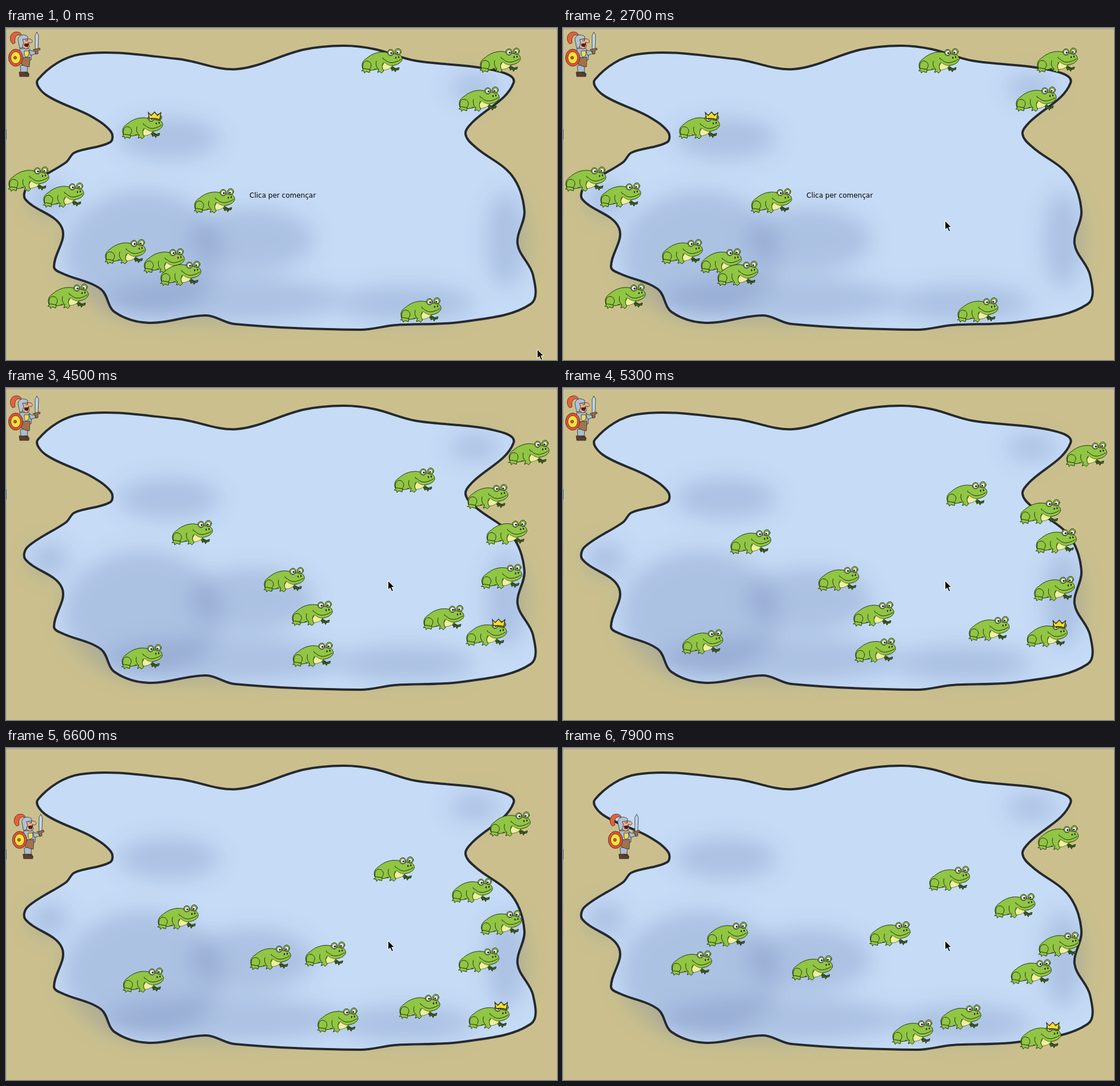
An HTML page for the animation above (8 s loop, 964 px wide and 581 px high).

```html
<!DOCTYPE html>
<html lang="ca">
<head>
<meta charset="utf-8">
<title>Granotes</title>
<style>
  html, body { margin: 0; width: 100%; height: 100%; overflow: hidden; background: #cbc08d; }
  svg { display: block; }
  text { font: 12px "DejaVu Sans", sans-serif; }
</style>
</head>
<body>
<svg width="964" height="581" viewBox="0 0 964 581">
  <defs>
    <filter id="soft" x="-60%" y="-60%" width="220%" height="220%"><feGaussianBlur stdDeviation="18"/></filter>

    <g id="frog" stroke="#22330f" stroke-linejoin="round" stroke-linecap="round" fill="#91c544">
      <path fill="#44682a" d="M53 31L61 36 67 34 66 38 60 39 53 37Z"/>
      <path d="M3 36C0 29 3 22 10 18C20 9 34 5 46 8L68 12C73 16 73 21 70 24C66 29 59 30 54 31C48 37 40 38 28 37C18 40 8 40 3 36Z"/>
      <path fill="#eff09c" stroke-width=".6" d="M24 37C33 36 39 31 41 25C45 29 50 31 55 31C52 36 44 40 36 38Z"/>
      <path d="M4 37C1 28 6 21 12 23C19 25 20 33 14 38Z"/>
      <path d="M5 36L1 40 5 40 6 44 9 41 15 43 16 38Z"/>
      <path d="M27 23C25 30 28 35 31 37L29 43 33 41 36 44 40 40C36 35 37 30 39 26"/>
      <path fill="#44682a" d="M55 35L54 40 58 38 60 42 62 38Z"/>
      <circle cx="52" cy="8" r="5.5"/><circle cx="65" cy="6.500" r="5.5"/>
      <g fill="#fff" stroke-width=".7"><circle cx="52" cy="8.500" r="3.9"/><circle cx="65" cy="7" r="3.5"/></g>
      <g fill="#22101c" stroke="none">
        <circle cx="53" cy="9" r="1.700"/><circle cx="64" cy="8" r="1.500"/>
        <ellipse cx="61" cy="17" rx="1.1" ry="1.8"/><ellipse cx="66" cy="16" rx="1.1" ry="1.8"/>
      </g>
      <path fill="none" d="M38 17q0 3 3 3q8 8 18 5q7-2 11-5"/>
    </g>
    <path id="crown" fill="#f3dc2c" stroke="#2b2b10" stroke-width="1.3" d="M49 9L47-2 52 3 58-3 63 3 69-2 67 10Q58 7 49 9Z"/>
  </defs>

  <rect width="964" height="581" fill="#cbc08d"/>
  <path class="pond" fill="#c6dbf6"/>
  <g id="shade" filter="url(#soft)" fill="#6078ab"></g>
  <path class="pond" fill="none" stroke="#25292f" stroke-width="4"/>
  <path d="M0 .5H964" stroke="#c9c9c6"/><path d="M0 1.500H964" stroke="#96917c"/>
  <path d="M.5 0V581" stroke="#a6a6a6"/><path d="M.5 177V195" stroke="#2d68b0"/>

  <text id="prompt" x="426" y="297">Clica per començar</text>
  <g id="frogs"></g>

  <g id="knight" stroke="#2e2a2c" stroke-width=".8" stroke-linejoin="round">
    <path fill="#e8603c" d="M20 24C20 15 24 9 20 6C14 5 10 11 12 20L8 22C1 17 2 2 13 1C22 0 24 6 23 10L22 24Z"/>
    <path fill="#a9bdd0" d="M21 60L22 72 33 73 34 58Z"/>
    <path fill="#5d3d2b" d="M19 71L28 71 36 76V79H20ZM28 71H34L37 76Z"/>
    <path fill="#a9bdd0" d="M20 30L36 30 41 36 40 50 21 50Z"/>
    <path fill="#a2724d" d="M24 46L38 45 37 62 30 61 22 57Z"/>
    <path fill="#efdc58" d="M28 34H36V42L31 45 28 42Z"/>
    <path fill="#efb08a" d="M24 13H34C42 12 44 18 40 20L35 19 37 27 31 31 24 27Z"/>
    <path fill="#adc3d8" d="M17 15C17 7 26 3 34 9L34 13 25 14 27 20 24 29 20 29Z"/>
    <path fill="#5a1719" d="M28 22L36 21 34 27 29 26Z"/>
    <circle cx="32" cy="15" r="2" fill="#fff"/><circle cx="32.700" cy="15" r=".6"/>
    <path fill="#a9bdd0" d="M36 33L46 35 48 39 39 42Z"/>
    <path fill="#bcd8e6" d="M47 31L47 7 50 1 53 7 52 31Z"/>
    <path fill="#9a6b45" d="M43 32L55 29 56 32 52 33 52 39 48 40 47 34Z"/>
    <ellipse cx="13" cy="46" rx="12.500" ry="15" fill="#e8502f"/>
    <ellipse cx="13" cy="46" rx="8.500" ry="10.500" fill="#f4e13a"/>
    <circle cx="12" cy="46" r="2.500" fill="#e8502f"/>
  </g>
  <path id="cursor" stroke="#fff" d="M.5.5V16L4 12.700 7 19 9.600 18 6.800 11.700H11.500Z"/>
</svg>

<script>
const $ = id => document.getElementById(id);
const place = (node, [x, y]) => node.setAttribute('transform', `translate(${x.toFixed(1)} ${y.toFixed(1)})`);
const clamp = (v, lo, hi) => Math.min(hi, Math.max(lo, v));
const points = text => text.trim().split(/\s+/).map(p => p.split(',').map(Number));

// Closed curve: handles follow the line between the neighbours, a third of the span long
function smooth(p) {
  const at = i => p[(i + p.length) % p.length];
  const handle = (i, side) => {
    const [x, y] = at(i), [ax, ay] = at(i - 1), [bx, by] = at(i + 1), [nx, ny] = at(i + side);
    const reach = side * Math.hypot(nx - x, ny - y) / 3 / Math.hypot(bx - ax, by - ay);
    return [x + (bx - ax) * reach, y + (by - ay) * reach];
  };
  return 'M' + p[0] + p.map((_, i) => 'C' + [handle(i, 1), handle(i + 1, -1), at(i + 1)]).join('') + 'Z';
}
const shore = smooth(points(`130,46 300,54 403,72 520,38 590,31 645,37 715,57 850,73 888,96 815,166 804,186
  822,209 885,258 907,320 895,378 922,432 918,483 800,514 680,520 620,528 400,518 350,503 250,516 190,497
  166,457 100,430 84,418 98,350 34,300 38,278 105,235 120,218 182,200 184,182 148,154 70,117 56,90`));
document.querySelectorAll('.pond').forEach(p => p.setAttribute('d', shore));

// Deeper water: cx, cy, rx, ry
$('shade').innerHTML = points(`285,193,90,36 820,104,44,24 75,300,35,30 240,395,140,110
  430,370,110,55 380,475,210,40 700,482,120,32 875,370,35,85`)
  .map(([x, y, rx, ry]) => `<ellipse cx="${x}" cy="${y}" rx="${rx}" ry="${ry}" opacity=".25"/>`).join('');

// Frogs walk at one speed and take a new heading every LEG hops
const SPEED = 4.76, LEG = 16, TURN = 8, LAST_HOP = 27;
function walk({ turn: [x, y], headings }, hop) {
  const walked = hop - TURN;
  const legs = [Math.min(walked, 0), clamp(walked, 0, LEG), Math.max(walked - LEG, 0)];
  headings.forEach((degrees, i) => {
    x += Math.cos(degrees * Math.PI / 180) * SPEED * legs[i];
    y += Math.sin(degrees * Math.PI / 180) * SPEED * legs[i];
  });
  return [x, y];
}
// Resting place, first turning point, three headings; the last one wears the crown
const frogs = [
  [622, 35, 893, 87, -14, 153, 67],
  [829, 34, 681, 153, 82, 136, 0],
  [792, 102, 807, 182, 90, 121, 154],
  [4, 242, 826, 231, 177, 85, 92],
  [65, 270, 303, 237, 26, 136, 75],
  [329, 280, 454, 299, -78, 121, 187],
  [173, 369, 836, 321, 72, 148, 34],
  [241, 385, 502, 386, 82, -66, -76],
  [270, 407, 718, 387, 147, 125, 184],
  [690, 471, 210, 436, -57, -96, 206],
  [73, 447, 498, 430, -104, 27, 45],
  [203, 150, 812, 395, -60, 93, 124]
].map(([hx, hy, tx, ty, ...headings], i, all) => {
  const node = document.createElementNS('http://www.w3.org/2000/svg', 'g');
  const parts = i === all.length - 1 ? ['frog', 'crown'] : ['frog'];
  node.innerHTML = parts.map(id => `<use href="#${id}" x="-1"/>`).join('');
  $('frogs').append(node);
  return { node, home: [hx, hy], turn: [tx, ty], headings };
});

const cursorPath = [[0, 929, 562], [3, 726, 380], [6, 685, 355], [12, 668, 337]];
function along(path, when) {
  const i = Math.max(1, path.findIndex(([t]) => t >= when));
  const [t0, x0, y0] = path[i - 1], [t1, x1, y1] = path[i];
  const f = (when - t0) / (t1 - t0);
  return [x0 + (x1 - x0) * f, y0 + (y1 - y0) * f];
}

// Time runs in tenths of a second; the game starts at 29
const START = 29, HOP_TIME = 1.45, STEP = 6.8;
function draw() {
  const t = Math.floor(performance.now() % 8000 / 100);
  const playing = t >= START;
  const hop = Math.min(LAST_HOP, Math.floor((t - START) / HOP_TIME + .46) - 6);
  $('prompt').style.display = playing ? 'none' : '';
  for (const frog of frogs) place(frog.node, playing ? walk(frog, hop) : frog.home);

  // A held key: one step, a pause, then a steady repeat
  const down = t < 45 ? 0 : clamp(1 + Math.floor((t - 53) * 12 / 7), 1, 16);
  const right = t < 64 ? 0 : clamp(1 + Math.floor((t - 72) * 10 / 7), 1, 11);
  place($('knight'), [4 + right * STEP, 6 + down * STEP]);
  place($('cursor'), along(cursorPath, Math.min(t, 12)));
  requestAnimationFrame(draw);
}
draw();
</script>
</body>
</html>
```
